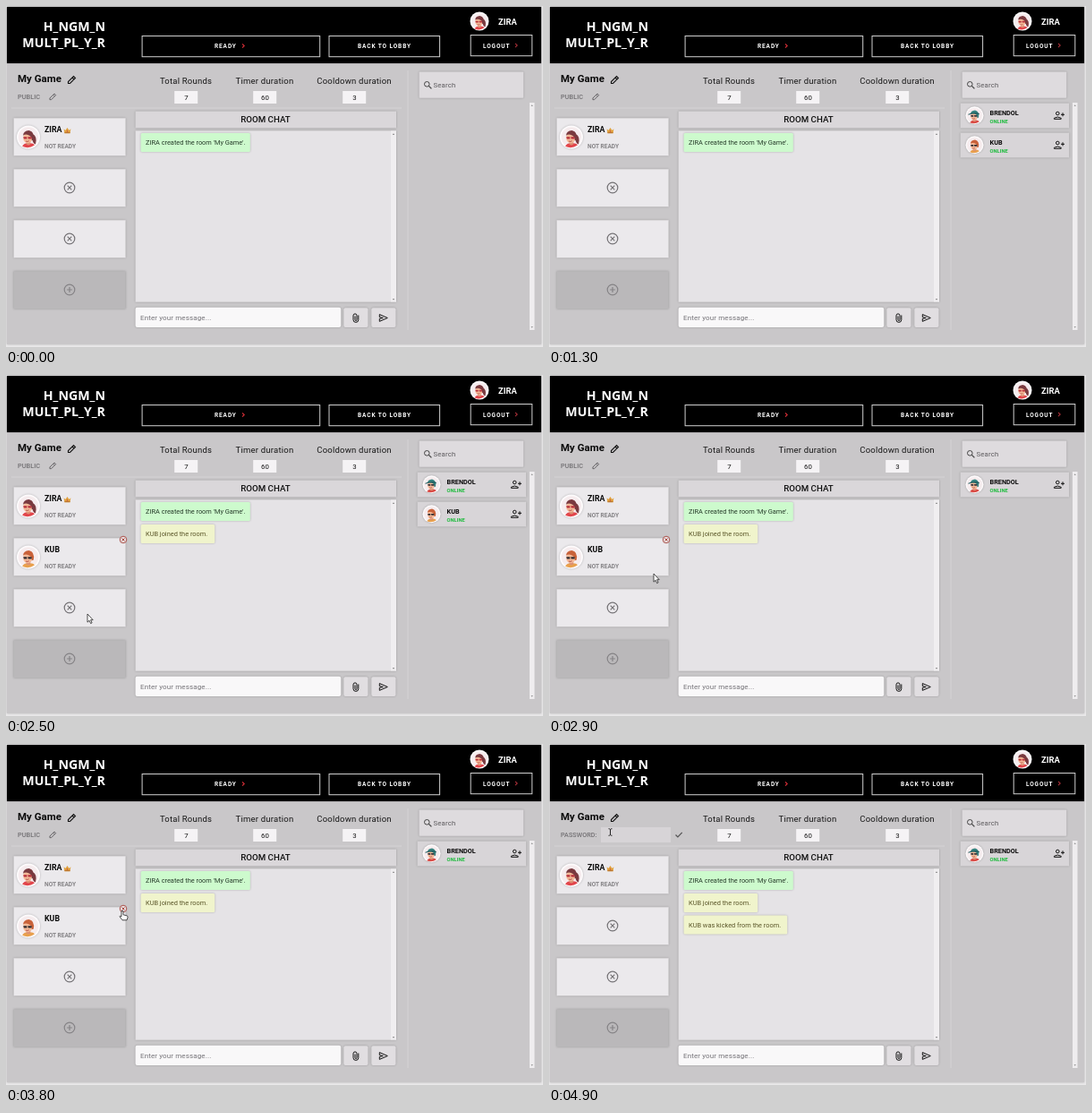
An HTML page that plays this animation: 600x381 px, repeating every 5000 ms.

```html
<!DOCTYPE html>
<html lang="en">
<head>
<meta charset="utf-8">
<title>Game room</title>
<style>
html, body { margin: 0; width: 100%; height: 100%; overflow: hidden; background: #c9c7c9; }
svg { display: block; width: 600px; height: 381px; font-family: Roboto, "Liberation Sans", sans-serif; }
.soft { filter: drop-shadow(0 .8px .8px rgba(0, 0, 0, .24)); }
</style>
</head>
<body>
<svg id="stage" viewBox="0 0 600 381" xmlns="http://www.w3.org/2000/svg"></svg>
<script>
const HOST = 'ZIRA', FRIEND = 'BRENDOL', GUEST = 'KUB';
const LOOP = 5000, STEP = 100;

const rect = (x, y, w, h, fill, more = '') =>
  `<rect x="${x}" y="${y}" width="${w}" height="${h}" fill="${fill}" ${more}/>`;
const soft = (x, y, w, h, fill, r = 0) => rect(x, y, w, h, fill, `rx="${r}" class="soft"`);
const text = (x, y, size, str, fill = '#111', weight = 400, more = '') =>
  `<text x="${x}" y="${y}" font-size="${size}" fill="${fill}" font-weight="${weight}" ${more}>${str}</text>`;
const line = (d, color, width = 1, more = '') =>
  `<path d="${d}" fill="none" stroke="${color}" stroke-width="${width}" ${more}/>`;
const circle = (x, y, r, fill, more = '') => `<circle cx="${x}" cy="${y}" r="${r}" fill="${fill}" ${more}/>`;
const at = (x, y, s, body) => `<g transform="translate(${x} ${y}) scale(${s})">${body}</g>`;
const group = (id, body) => `<g id="${id}">${body}</g>`;
const MID = 'text-anchor="middle"';

// Cartoon heads in a circle of radius 10
const looks = {
  host: { hair: '#7a3a3f', shirt: '#e2454b', glasses: '#b8303c',
    extra: '<path d="M4-4Q9-2 7 6Q4 5 4 1Z" fill="#7a3a3f"/>' },
  friend: { hair: '#35837f', shirt: '#d94a45', glasses: '#36343c',
    extra: '<path d="M-8-2.6Q0-6 6-3.6L6-2Q0-4-8-1.6Z" fill="#235e60"/>' },
  guest: { hair: '#c9623a', shirt: '#e8a04c', glasses: '#302b31', extra: '' }
};
const avatar = (x, y, r, { hair, shirt, glasses, extra }) => at(x, y, r / 10,
  circle(0, 0, 10, '#fdfbfc', 'class="soft"') + circle(0, 0, 8.6, '#f6ecee') +
  at(0, .8, .88, `<path d="M-6 8Q-4 4.6 0 5Q5 4.6 6 7Q0 11-6 8Z" fill="${shirt}"/>
  <path d="M-2 2h4v4l-2 1-2-1Z" fill="#dc9074"/>
  <ellipse cx="-.6" cy="0" rx="4.4" ry="5" fill="#f3b997"/>
  <path d="M-5.2-2.4Q-5-7 .6-7.4Q6.6-6 5 2L3.4 2.4Q3.6-2-.4-3.2Q-3-4-5.2-2.4Z" fill="${hair}"/>
  ${extra}
  <path d="M-5-1.2h3.6v2H-4.4ZM-.6-1.2h3.8v2H-.2Z" fill="${glasses}"/>
  <path d="M-2.6 3Q-1 4 .6 2.8" fill="none" stroke="#b24a47" stroke-width=".8"/>`));

const pencil = (x, y, s, color) => at(x, y, s,
  line('M-8 8V4L4-8L8-4L-4 8ZM1-5L5-1', color, 2.2));
const chevron = (x, color = '#dc2f38', y = 44.5) =>
  line(`M${x} ${y - 2.2}l2.2 2.2-2.2 2.2`, color, 1.1);
const ring = (x, y, r, mark, color, width) =>
  circle(x, y, r, 'none', `stroke="${color}" stroke-width="${width}"`) + at(x, y, r / 6, line(mark, color, width * 6 / r));
const CROSS = 'M-2.4-2.4L2.4 2.4M2.4-2.4L-2.4 2.4';
const PLUS = 'M-3 0H3M0-3V3';

const headerButton = (x, y, w, h) =>
  rect(x, y, w, h, '#000', 'stroke="#cfcfcf" stroke-width="1"');
const caps = (x, y, str) => text(x, y, 6.5, str, '#fff', 700, 'letter-spacing=".9"');

const header = () =>
  soft(1, 1, 597, 63, '#000') +
  ['H_NGM_N', 'MULT_PL_Y_R'].map((s, i) =>
    text(111, 28.2 + i * 18.2, 14.2, s, '#fff', 700,
      'text-anchor="end" font-family="Open Sans, Noto Sans, sans-serif"')).join('') +
  headerButton(152.1, 33.5, 198.6, 23.2) + caps(233, 47, 'READY') + chevron(264) +
  headerButton(361, 33.5, 123.6, 23.2) + caps(393, 47, 'BACK TO LOBBY') +
  headerButton(519.2, 32.5, 68.6, 23.2) + caps(533, 46.5, 'LOGOUT') + chevron(569, '#a83038', 44) +
  avatar(529, 17, 10.5, looks.host) + text(550, 20.5, 9.4, HOST, '#fff', 700);

const settings = () =>
  text(13, 85, 11.5, 'My Game', '#0a0a0a', 600) + pencil(73.5, 82.5, .5, '#111') +
  [['Total Rounds', 201, 7], ['Timer duration', 289, 60], ['Cooldown duration', 389, 3]]
    .map(([label, x, n]) => text(x, 87.2, 9.5, label, '#161616', 400, MID + ' letter-spacing=".22"') +
      rect(x - 12.8, 95, 26, 14, '#f5f3f5') + text(x + .5, 105, 7.8, n, '#111', 400, MID)).join('') +
  rect(6, 113.5, 436, 1, '#d6d4d6') + rect(448.5, 72, 1, 290, '#d6d4d6');

const player = (y, look, name) =>
  avatar(25, y + 21.5, 13, look) + text(43, y + 16.2, 8.8, name, '#0a0a0a', 700) +
  text(43, y + 34.2, 6.6, 'NOT READY', '#858386', 600);

const crown = () => at(68.5, 139.3, .9,
  '<path d="M-4.3-2.2l2 2L0-3.6 2.3-.2l2-2L3.4 3.4H-3.4Z" fill="#e0a13c"/>' +
  line('M-3.4 2.6H3.4', '#b06a2c', 1) + circle(0, .8, .8, '#c4484a'));

const slot = (y, fill) => soft(8.6, y + .3, 125, 42, fill);
const slots = () => [125, 182, 239].map(y => slot(y, '#ebe9ec')).join('') +
  slot(296, '#bab8ba') + ring(71, 317, 5.8, PLUS, '#858386', 1.2) +
  player(125, looks.host, HOST) + crown() + ring(71, 260, 5.8, CROSS, '#737174', 1.2);

const note = (y, w, str, fill, color) =>
  soft(150.6, y, w, 21, fill, 1.5) + text(156, y + 13.4, 7.4, str, color);

const chat = () =>
  soft(144.6, 117.6, 291.4, 18.6, '#dad7da') + text(290, 130.3, 9.7, 'ROOM CHAT', '#111', 500, MID) +
  soft(144.6, 139.3, 291.4, 191.4, '#e5e3e6') + rect(430, 139.5, 6, 191, '#f0eef0') +
  '<path d="M431.8 144l1.2-1.7 1.2 1.7ZM431.8 327l1.2 1.7 1.2-1.7Z" fill="#888"/>' +
  note(142, 122.2, `${HOST} created the room 'My Game'.`, '#cdfacd', '#253a29') +
  soft(144.6, 336.8, 229.6, 22.2, '#f9f8f9', 2) +
  text(150, 351, 8, 'Enter your message...', '#77757a', 400, 'letter-spacing=".12"') +
  soft(377.3, 337.3, 27.2, 21.7, '#e1dee1', 2) + soft(408.3, 337.3, 27.2, 21.7, '#e1dee1', 2) +
  line('M393.8 345.5v5a2.9 2.9 0 0 1-5.8 0v-4.6a2 2 0 0 1 4 0v4.6a1 1 0 0 1-2 0v-4', '#111', 1) +
  line('M417.3 344.6l9 3.9-9 3.9v-3l4-.9-4-.9Z', '#111', 1);

const friend = (y, look, name) =>
  soft(459.6, y - .4, 121.6, 27.8, '#d8d5d8') + avatar(475.5, y + 13.3, 10, look) +
  text(492.5, y + 13.2, 7.3, name, '#0a0a0a', 600) + text(492.5, y + 21.6, 5.8, 'ONLINE', '#1cbb3c', 700) +
  circle(568.3, y + 11, 1.8, 'none', 'stroke="#111"') +
  line(`M564.4 ${y + 17.3}v-1q3.9-2.6 7.8 0v1ZM572 ${y + 12.3}h4M574 ${y + 10.3}v4`, '#111', 1);

const sidebar = () =>
  soft(461.6, 73.6, 116.6, 29.2, '#dedbde', 1) + circle(470.3, 87.3, 2.8, 'none', 'stroke="#444"') +
  line('M472.4 89.4l3 3', '#444', 1.3) +
  text(477.5, 91, 7.8, 'Search', '#5c5a5d', 400, 'letter-spacing=".15"') +
  rect(585, 108, 5.5, 254, '#efedef') +
  '<path d="M586.5 112l1.2-1.7 1.2 1.7ZM586.5 358l1.2 1.7 1.2-1.7Z" fill="#999"/>';

const cursors = {
  arrow: '<path d="M0 0V9.2L2.1 7.3 3.6 10.6 5.1 9.9 3.6 6.7H6.2Z" fill="#fff" stroke="#222" stroke-width=".8"/>',
  hand: '<path d="M-1 0Q0-1 1 0V4L5 5Q6 5 6 7L5 10H0L-3 6Q-3 4.6-1 6Z" fill="#fff" stroke="#222" stroke-width=".8"/>',
  beam: line('M-2-3.8Q0-3.8 0-3V3Q0 3.8-2 3.8M2-3.8Q0-3.8 0-3V3Q0 3.8 2 3.8', '#222', .9)
};

const stage = document.getElementById('stage');
stage.innerHTML =
  rect(0, 0, 600, 381, '#e9e8e9') + soft(1, 1, 597, 377, '#c9c7c9') +
  header() + settings() + slots() + chat() + sidebar() +
  group('public', text(13, 104, 7.4, 'PUBLIC', '#737174', 500) + pencil(52.3, 101.3, .42, '#5c5a5d')) +
  group('password', text(13, 104, 7.3, 'PASSWORD:', '#737174', 500) +
    rect(58, 93, 78, 17, '#d7d4d7') + line('M141.5 101.5l2.4 2.4 4.8-5', '#555', 1.3)) +
  group('empty', ring(71, 203, 5.8, CROSS, '#737174', 1.2)) +
  group('guest', player(182, looks.guest, GUEST) +
    circle(131, 184, 4, '#e8dede') + ring(131, 184, 3.8, CROSS, '#a3433d', .9)) +
  group('joined', note(167, 82.6, `${GUEST} joined the room.`, '#f0f4cc', '#5b5629')) +
  group('kicked', note(191.6, 115.6, `${GUEST} was kicked from the room.`, '#f0f4cc', '#5b5629')) +
  group('friendRow', friend(109, looks.friend, FRIEND)) +
  group('guestRow', friend(142, looks.guest, GUEST)) +
  Object.keys(cursors).map(k => group(k, cursors[k])).join('');

// Spans in which each part is shown
const spans = {
  public: [0, 4800], password: [4800, LOOP],
  guest: [1400, 3900], joined: [1400, LOOP], kicked: [3900, LOOP],
  friendRow: [300, LOOP], guestRow: [300, 2600],
  arrow: [2400, 3300], hand: [3300, 3900], beam: [4800, LOOP]
};
// Pointer stops: time, x, y
const path = [[2400, 84, 269], [2500, 91, 267], [2600, 99, 254], [2900, 117, 222], [3200, 129, 197],
  [3300, 131, 188], [3400, 130, 186], [3900, 130, 187], [4100, 131, 188], [4400, 131, 191],
  [4600, 79, 118], [4700, 53, 100], [4800, 60, 99], [4900, 68.5, 98.5]];

function pointer(t) {
  const i = path.findIndex(p => p[0] > t);
  if (i < 1) return path[i ? path.length - 1 : 0].slice(1);
  const [t0, x0, y0] = path[i - 1], [t1, x1, y1] = path[i], k = (t - t0) / (t1 - t0);
  return [x0 + (x1 - x0) * k, y0 + (y1 - y0) * k];
}

const part = id => document.getElementById(id);
const show = (id, on) => { part(id).style.display = on ? '' : 'none'; };

function draw(now) {
  const t = Math.floor(now % LOOP / STEP) * STEP;
  const within = id => t >= spans[id][0] && t < spans[id][1];
  for (const id in spans) show(id, within(id));
  show('empty', !within('guest'));
  show('arrow', within('arrow') || (t >= 3900 && t < 4700));
  show('hand', within('hand') || t === 4700);
  const [x, y] = pointer(t);
  for (const id in cursors) part(id).setAttribute('transform', `translate(${x} ${y})`);
}

const start = performance.now();
function tick() {
  draw(performance.now() - start);
  requestAnimationFrame(tick);
}
tick();
</script>
</body>
</html>
```
